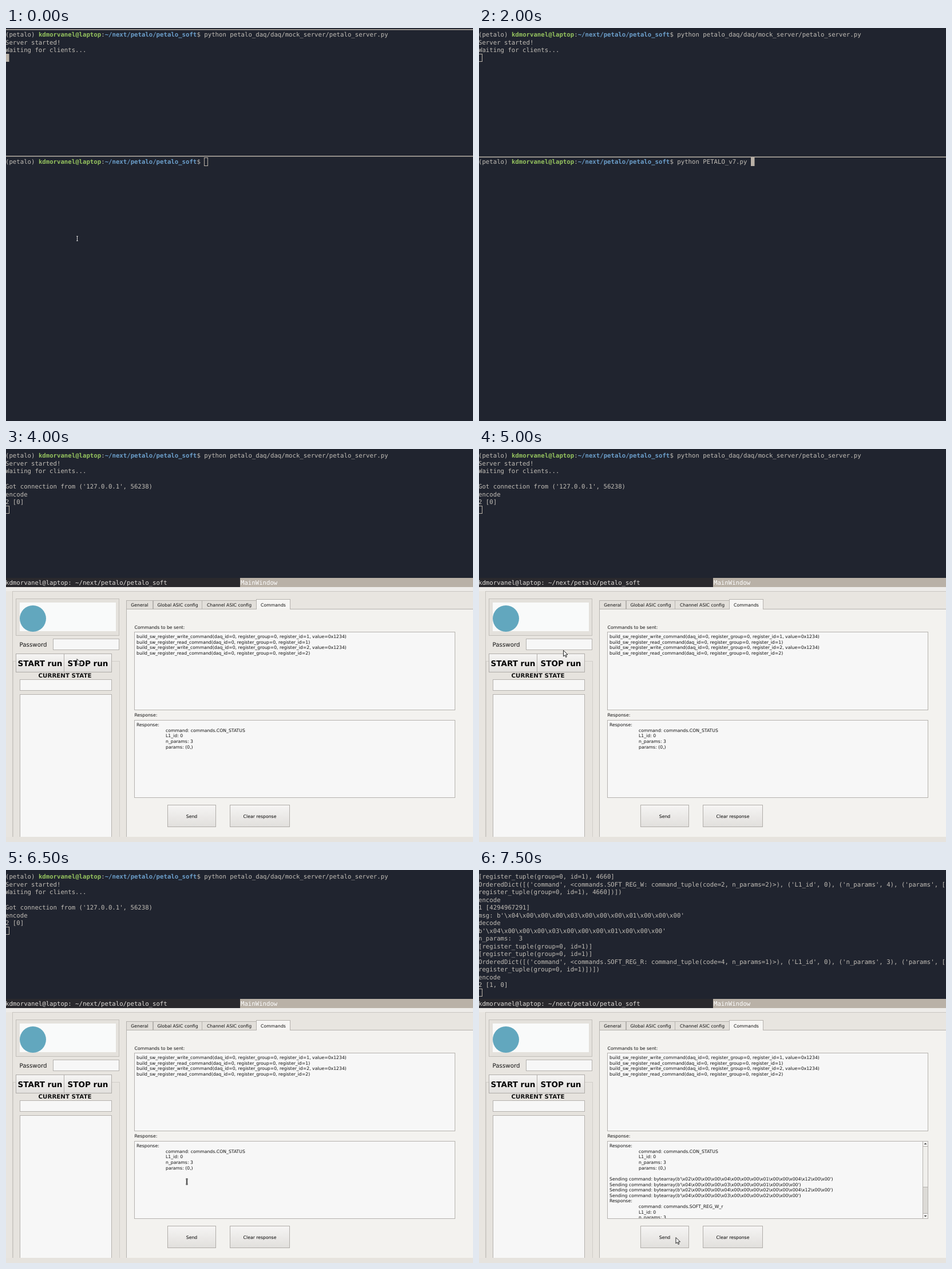
Write an HTML page with a canvas that moves like this. It is 816 by 686 pixels and loops after 8000 ms.

```html
<!DOCTYPE html>
<html lang="en">
<head>
<meta charset="utf-8">
<title>Server and control window</title>
<style>
  html, body { margin: 0; width: 100%; height: 100%; overflow: hidden; background: #20242f; }
  canvas { display: block; width: 816px; height: 686px; }
</style>
</head>
<body>
<canvas id="stage" width="816" height="686"></canvas>
<script>
const ctx = document.getElementById('stage').getContext('2d');
ctx.textRendering = 'geometricPrecision';

const LOOP = 8000, CELL = 6.432, ROW = 13.5, LEFT = -1;
const MONO = '10.684px "DejaVu Sans Mono", monospace';
const SANS = '"DejaVu Sans", sans-serif';
const SMALL = '7.74px ' + SANS;
const INK = '#c1bdb6', SAND = '#b9b1a7', EDGE = '#b5b2ae', PAPER = '#f7f7f7';
const USER = 'kdmorvanel@laptop', FOLDER = '~/next/petalo/petalo_soft';
const PROMPT_LENGTH = `(petalo) ${USER}:${FOLDER}$ `.length;

const waiting = ['Server started!', 'Waiting for clients...'];
const connected = [...waiting, '', "Got connection from ('127.0.0.1', 56238)", 'encode', '2 [0]'];
const readBytes = id => `b'\\x04\\x00\\x00\\x00\\x03\\x00\\x00\\x00\\x0${id}\\x00\\x00\\x00'`;
const writeBytes = id => `b'\\x02\\x00\\x00\\x00\\x04\\x00\\x00\\x00\\x0${id}\\x00\\x00\\x004\\x12\\x00\\x00'`;
const ordered = (kind, code, count, total) =>
  `OrderedDict([('command', <commands.SOFT_REG_${kind}: command_tuple(code=${code}, n_params=${count})>), ('L1_id', 0), ('n_params', ${total}), ('params', [`;
const exchanged = [
  '[register_tuple(group=0, id=1), 4660]',
  ordered('W', 2, 2, 4),
  'register_tuple(group=0, id=1), 4660])])',
  'encode',
  '1 [4294967291]',
  'msg: ' + readBytes(1),
  'decode',
  readBytes(1),
  'n_params:  3',
  '[register_tuple(group=0, id=1)]',
  '[register_tuple(group=0, id=1)]',
  ordered('R', 4, 1, 3),
  'register_tuple(group=0, id=1)])])',
  'encode',
  '2 [1, 0]'
];

const commands = [1, 2].flatMap(id => [
  `build_sw_register_write_command(daq_id=0, register_group=0, register_id=${id}, value=0x1234)`,
  `build_sw_register_read_command(daq_id=0, register_group=0, register_id=${id})`
]);
const status = ['Response:', '\tcommand: commands.CON_STATUS', '\tL1_id: 0', '\tn_params: 3', '\tparams: (0,)'];
const sent = [...status, '',
  ...[1, 2].flatMap(id => [writeBytes(id), readBytes(id)]).map(b => `Sending command: bytearray(${b})`),
  'Response:', '\tcommand: commands.SOFT_REG_W_r', '\tL1_id: 0', '\tn_params: 3'];

// Pointer poses: start time, x, y, shape
const pointer = [
  [0, 124.5, 367.5, 'thinBeam'], [2000], [4000, 123.5, 366, 'arrow'], [5000, 147, 351, 'arrow'],
  [5500, 205, 361, 'arrow'], [6000, 257, 376, 'beam'], [6500, 316, 544, 'beam'], [7000, 343.5, 641, 'arrow']
];

function fill(color, x, y, w, h) {
  ctx.fillStyle = color;
  ctx.fillRect(x, y, w, h);
}

function box(x, y, w, h, color, edge = EDGE) {
  if (color) fill(color, x, y, w, h);
  ctx.strokeStyle = edge;
  ctx.lineWidth = 1;
  ctx.strokeRect(x + .5, y + .5, w - 1, h - 1);
}

function text(string, x, y, font = SMALL, color = '#111', align = 'left') {
  ctx.font = font;
  ctx.fillStyle = color;
  ctx.textAlign = align;
  ctx.fillText(string, x, y);
}

const mono = (string, column, y, color = INK, weight = '') =>
  text(string, LEFT + column * CELL, y, weight + MONO, color);

function prompt(y, command) {
  mono('(petalo)', 0, y);
  mono(USER, 9, y, '#95c35f', 'bold ');
  mono(':', 26, y);
  mono(FOLDER, 27, y, '#6c9fcb', 'bold ');
  mono('$ ' + command, PROMPT_LENGTH - 2, y);
}

function cursor(column, y, solid, h = 14) {
  const x = Math.round(LEFT + column * CELL);
  if (solid) fill(SAND, x, y, 6.5, h);
  else box(x, y, 7, h, null, SAND);
}

function terminals(t) {
  fill('#20242f', 0, 0, 816, 686);
  const scrolled = t >= 7500;
  const rows = scrolled ? exchanged : t >= 4000 ? connected : waiting;
  const first = scrolled ? 0 : 1;
  if (!scrolled) prompt(15.2, 'python petalo_daq/daq/mock_server/petalo_server.py');
  rows.forEach((row, i) => mono(row, 0, 15.2 + (i + first) * ROW));
  cursor(0, Math.round(4.5 + (rows.length + first) * ROW), t < 1000);
  if (t >= 4000) return;

  if (t < 1000) fill(SAND, 0, 2, 816, 1.5);
  fill(SAND, 0, t < 1000 ? 223 : 224.5, 816, 1.5);
  prompt(237.2, t < 2000 ? '' : 'python PETALO_v7.py');
  if (t < 3500) cursor(PROMPT_LENGTH + (t < 2000 ? 0 : 20), 226, t >= 1000, 15);
  else cursor(0, 240, true);
}

function button(label, x, y, w, h, font, baseline) {
  const shade = ctx.createLinearGradient(0, y, 0, y + h);
  shade.addColorStop(0, '#f6f5f4');
  shade.addColorStop(1, '#e1dfdc');
  box(x, y, w, h, shade, '#b0ada9');
  text(label, x + w / 2, baseline, font, '#000', 'center');
}

function tab(label, x, w, selected) {
  const y = selected ? 262 : 264;
  box(x, y, w, 280 - y, selected ? '#f7f6f4' : '#e2dfda');
  if (selected) fill('#f3f2ef', x + 1, 278, w - 2, 3);
  text(label, x + w / 2, 274.7, SMALL, '#111', 'center');
}

function lines(rows, y) {
  rows.forEach((row, i) => text(row.trim(), row[0] === '\t' ? 279 : 228, y + i * 9.62));
}

function triangle(x, y, direction) {
  ctx.fillStyle = '#444';
  ctx.beginPath();
  ctx.moveTo(x - 2.5, y + direction);
  ctx.lineTo(x + 2.5, y + direction);
  ctx.lineTo(x, y - 1.5 * direction);
  ctx.fill();
}

function sidebar() {
  box(11, 248, 820, 450, '#e8e5e0', '#c9c6c1');
  box(12, 370, 187, 320, '#e6e3de', '#d0cdc8');
  box(17, 261, 181, 65, '#e4e1dc', '#c2bfba');
  fill('#f9fafa', 24, 268, 168, 50);
  ctx.fillStyle = '#62a7be';
  ctx.beginPath();
  ctx.arc(47, 296, 23, 0, 2 * Math.PI);
  ctx.fill();

  text('Password', 23.5, 345, '10.3px ' + SANS);
  box(82, 331, 116, 20, PAPER);
  button('START run', 17, 357, 85, 33, 'bold 13.5px ' + SANS, 378.5);
  button('STOP run', 101, 357, 84, 33, 'bold 13.5px ' + SANS, 378.5);
  text('CURRENT STATE', 103, 398.5, 'bold 10.3px ' + SANS, '#111', 'center');
  box(24, 402, 161, 20, PAPER);
  box(24, 428, 161, 260, PAPER);
}

function controlWindow(t) {
  fill('#2a292d', 0, 225, 409, 16);
  fill(SAND, 409, 225, 407, 16);
  text(`${USER}: ${FOLDER}`, LEFT, 237, MONO, '#dedbd7');
  text('MainWindow', 410, 237, MONO, '#fff');

  fill('#eeece9', 0, 241, 816, 445);
  fill('#e8e5e0', 0, 248, 12, 438);
  sidebar();

  box(210, 279, 620, 420, '#f3f2ef');
  tab('General', 210, 47);
  tab('Global ASIC config', 257, 86);
  tab('Channel ASIC config', 342, 96);
  tab('Commands', 437, 60, true);

  text('Commands to be sent:', 224.5, 313.5);
  box(224, 319, 561, 137, PAPER);
  lines(commands, 330.2);

  text('Response:', 224.5, 467.3);
  box(224, 473, 561, 136, PAPER);
  ctx.save();
  ctx.beginPath();
  ctx.rect(225, 474, 559, 134);
  ctx.clip();
  lines(t >= 7500 ? sent : status, 484.2);
  ctx.restore();
  if (t >= 7500) {
    box(775, 473, 10, 136, '#dcdad6');
    box(775, 473, 10, 10, '#f3f2f0');
    box(775, 482, 10, 72, '#f0efec');
    box(775, 599, 10, 10, '#f3f2f0');
    triangle(780, 478, 1);
    triangle(780, 604, -1);
  }

  button('Send', 282, 621, 85, 39, SMALL, 643.5);
  button('Clear response', 391, 621, 105, 39, SMALL, 643.5);
  fill('#e6e3de', 0, 677, 816, 9);
}

function beam(size) {
  ctx.beginPath();
  ctx.moveTo(-size / 3, -size);
  ctx.lineTo(size / 3, -size);
  ctx.moveTo(0, -size);
  ctx.lineTo(0, size);
  ctx.moveTo(-size / 3, size);
  ctx.lineTo(size / 3, size);
}

function stroke(color, width) {
  ctx.strokeStyle = color;
  ctx.lineWidth = width;
  ctx.stroke();
}

function drawPointer(t) {
  const [, x, y, shape] = pointer.findLast(pose => pose[0] <= t);
  if (!shape) return;
  ctx.save();
  ctx.translate(x, y);
  if (shape === 'arrow') {
    ctx.fillStyle = '#fff';
    ctx.fill(arrow);
    ctx.strokeStyle = '#222';
    ctx.lineWidth = 1;
    ctx.stroke(arrow);
  } else if (shape === 'beam') {
    beam(4.5);
    stroke('#333', 2.4);
    stroke('#aaa', .6);
  } else {
    beam(4);
    stroke('#d5d5d5', 1);
  }
  ctx.restore();
}

const arrow = new Path2D('M.5 .5V11L3 8.7L4.7 12.5L6.3 11.8L4.7 8H8Z');

function draw() {
  const t = performance.now() % LOOP;
  terminals(t);
  if (t >= 4000) controlWindow(t);
  drawPointer(t);
  requestAnimationFrame(draw);
}
draw();
</script>
</body>
</html>
```
